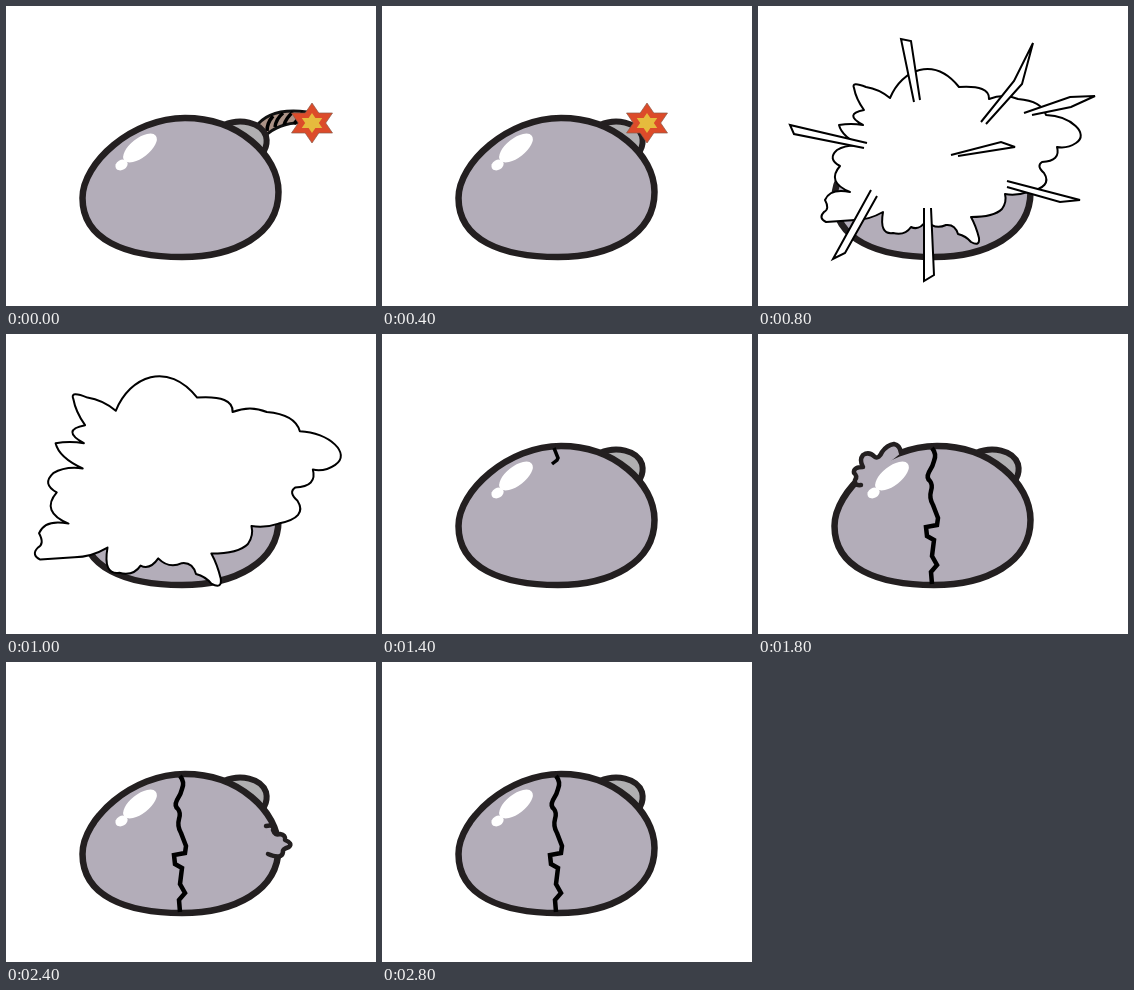
These frames come from a looping animation (370x300 px, 3000 ms). An HTML page:

```html
<!DOCTYPE html>
<html lang="en">
<head>
<meta charset="utf-8">
<title>Cracking bomb</title>
<style>
  html, body { margin: 0; width: 100%; height: 100%; overflow: hidden; background: #fff; }
  svg { display: block; width: 100%; height: 100%; }
  .body, .bump { fill: #b3adb9; stroke: #231f20; stroke-width: 6.5; }
  .bump { stroke-width: 4.5; stroke-linecap: round; stroke-linejoin: round; }
  .bump, #cloud { vector-effect: non-scaling-stroke; }
  #cloud, #spikes { fill: #fff; stroke: #000; stroke-width: 2; }
  #cloud { stroke-linejoin: round; }
  .line { fill: none; stroke: #000; }
</style>
</head>
<body>
<svg viewBox="0 0 370 300">
  <defs>
    <clipPath id="fuseClip"><rect id="fuseLength" x="240" y="90" width="66" height="50"/></clipPath>
    <path id="hexagram" d="M0-20 6.8-10H20.5L13.7 0 20.5 10H6.8L0 20-6.8 10H-20.5L-13.7 0-20.5-10H-6.8Z"/>
  </defs>

  <g id="fuse" clip-path="url(#fuseClip)">
    <path d="M249 122Q263 101 301 106V117Q274 115 258 131Z" fill="#ab9286" stroke="#111" stroke-width="3"/>
    <path class="line" stroke-width="3.5" d="M261 125Q261 117 267 110M269 121Q270 113 277 107M278 119Q280 112 287 106M288 118 297 106"/>
  </g>
  <path d="M218 119C234 112 255 116 260 130Q262 138 258 145L240 140Z" fill="#b0afb1" stroke="#231f20" stroke-width="6"/>
  <path class="body" d="M76.5 192C76.5 157 126 112 179 112C232 112 272.5 149 272.5 186C272.5 229 228 251 176 251C120 251 76.5 234 76.5 192Z"/>

  <path id="bumpTop" class="bump" d="M103 151Q96 152 97 146Q100 142 96 139Q95 133 105 133Q101 126 105 121Q111 117 117 123Q121 125 124 118Q129 111 136 110Q142 111 143 119"/>
  <path id="bumpRight" class="bump" d="M260 164Q269 162 267 168Q269 174 274 172Q280 173 279 178Q287 181 283 185Q276 187 277 190Q276 198 262 192"/>
  <path id="bumpBottom" class="bump" d="M86 224Q77 231 85 237Q84 246 95 246Q100 257 110 253Q118 265 128 256Q139 261 142 248"/>

  <g fill="#fff">
    <ellipse rx="20" ry="9.5" transform="translate(134 142) rotate(-38)"/>
    <ellipse rx="6.5" ry="5" transform="translate(115.5 159) rotate(-30)"/>
  </g>
  <path id="crack" class="line"/>

  <path id="cloud" d="M96 82Q93 75 108 81Q121 83 132 92C144 63 176 50 201 81Q232 79 231 93Q246 87 260 93Q284 95 288 109C313 110 332 128 318 137Q309 143 299 141Q303 155 284 156Q278 160 286 167Q295 181 270 186Q258 190 247 188Q249 196 244 203Q236 211 213 211Q218 220 221 232Q222 241 213 236Q208 230 200 228Q197 218 188 219Q177 224 168 215Q161 225 153 221Q147 230 135 227Q121 229 125 206Q111 214 97 214L68 216Q60 212 66 206Q72 203 67 194Q72 182 92 186Q68 176 82 160Q69 153 79 144Q89 138 104 140Q84 131 81 119Q93 117 105 119Q85 108 106 104Q98 93 96 82Z"/>
  <path id="spikes" d="M156 96 143 33 153 35 162 94M223 116 256 75 275 37 264 78 228 118M266 107 312 91 337 90 313 101 274 109M193 149 243 136 257 141 200 150M249 175 322 194 302 196 249 181M166 202V275L176 269 173 202M113 184 75 253 87 247 119 190M109 137 32 119 36 128 106 142"/>

  <g id="star" stroke="#8a5a48" stroke-width=".7">
    <use href="#hexagram" fill="#dc4b2a"/>
    <use href="#hexagram" fill="#e6bb3d" stroke="none" transform="scale(.5)"/>
  </g>
</svg>
<script>
const el = id => document.getElementById(id);
const show = (id, on) => el(id).style.display = on ? "" : "none";
const place = (id, transform) => {
  show(id, transform);
  if (transform) el(id).setAttribute("transform", transform);
};
const about = (x, y, sx, sy = sx) => `translate(${x} ${y}) scale(${sx} ${sy}) translate(${-x} ${-y})`;

// Value of the latest [start, value] step at time t.
const at = (steps, t) => steps.reduce((value, [start, next]) => t >= start ? next : value, null);

const still = "scale(1)";
const starX = [[0, 306], [200, 275], [400, 265], [600, null]];
const clouds = [[600, about(190, 157, .56)], [800, still],
  [1000, "matrix(1.18 0 0 1.2 -46 -33.6)"], [1200, "matrix(1.195 0 0 1.143 -49 -22)"], [1400, null]];
const bumps = {
  bumpTop: [[1800, still], [2000, about(127, 133, 1.25)], [2100, still], [2200, null]],
  bumpRight: [[2200, still], [2300, about(262, 179, 1.85, 1.3)], [2400, still], [2500, null]],
  bumpBottom: [[2600, about(118, 230, .8)], [2700, still], [2800, null]]
};
const shortCrack = "M172 114 176 124 175 126 170 130";
const halfCrack = "M174 114Q179 120 176 127Q175 132 171 138Q168 144 172 147Q175 151 173 157Q171 164 175 171L180 184 179 191";
const fullCrack = halfCrack + "L168 193 169 202 176 206 174 222 179 231 173 238 174 250";
const cracks = [[1400, shortCrack], [1600, halfCrack], [1800, fullCrack]];

function draw(now) {
  const t = now % 3000;
  const x = at(starX, t);
  place("star", x && `translate(${x} 117)`);
  show("fuse", t < 400);
  el("fuseLength").setAttribute("width", Math.max(0, x - 240));
  place("cloud", at(clouds, t));
  show("spikes", t >= 800 && t < 1000);
  el("crack").setAttribute("d", at(cracks, t) || "");
  el("crack").setAttribute("stroke-width", t < 1600 ? 3.5 : 4.5);
  for (const id in bumps) place(id, at(bumps[id], t));
  requestAnimationFrame(draw);
}
draw(0);
</script>
</body>
</html>
```
